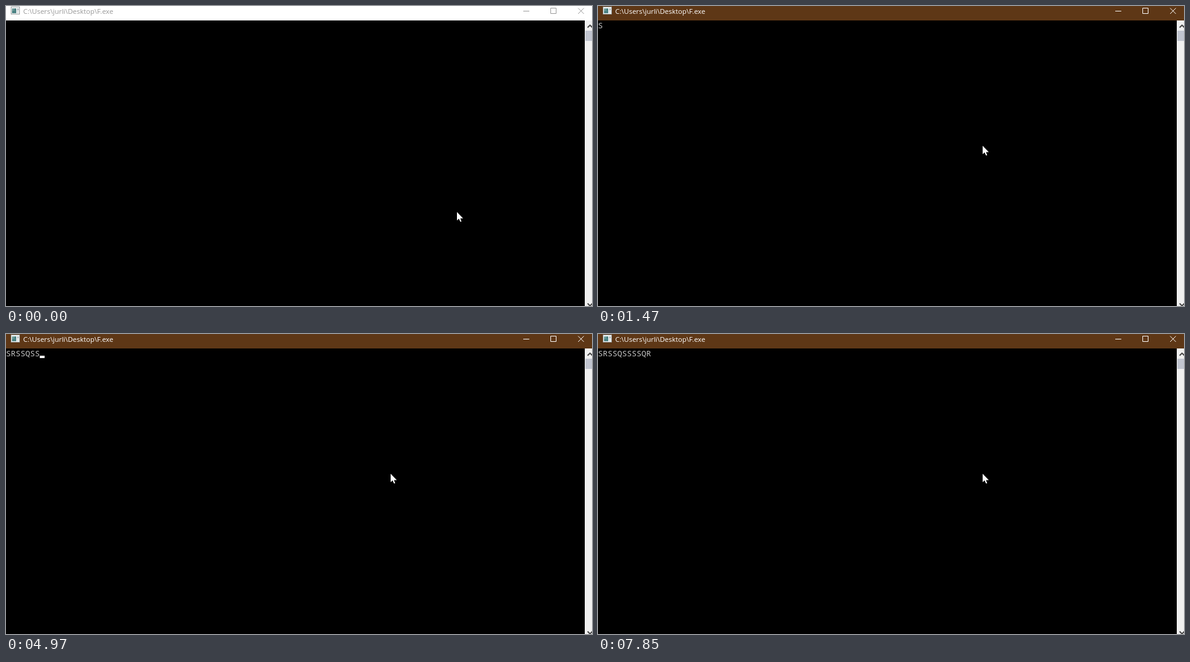
These frames come from a looping animation (972 by 498 pixels, 8 s). An HTML page:

```html
<!DOCTYPE html>
<html lang="en">
<head>
<meta charset="utf-8">
<title>Console</title>
<style>
  html, body { margin: 0; width: 100%; height: 100%; overflow: hidden; background: #000; }
  svg { display: block; width: 972px; height: 498px; }

  .bar, .ink, .pointer, .click, .cover, .caret {
    animation: 8000ms step-end -1ms infinite;
  }
  .bar { animation-name: bar; }
  .ink { animation-name: ink; }
  .pointer { animation-name: move; }
  .click { animation-name: click; }
  .cover { animation-name: type; }
  .caret { animation-name: blink; }

  .title { font: 11.5px "Open Sans", "Noto Sans", sans-serif; fill: currentColor; }
  .typed { font: 13.333px "Noto Sans Mono", "DejaVu Sans Mono", monospace; fill: #c4c4c4; white-space: pre; }
  .line { fill: none; stroke: currentColor; }

  /* the window gains focus on the click */
  @keyframes bar { 0% { fill: #fff; } 5.625%, 100% { fill: #5e3716; } }
  @keyframes ink { 0% { color: #999; } 5.625%, 100% { color: #fff; } }
  @keyframes click { 0%, 6.75%, 100% { opacity: 0; } 5.625% { opacity: 1; } }

  @keyframes move {
    0% { transform: translate(748px, 342px); }
    .875% { transform: translate(693px, 287px); }
    1.875%, 100% { transform: translate(638px, 232px); }
  }

  /* one 8px cell is uncovered per key press */
  @keyframes type {
    0% { transform: translateX(0); }
    18.375% { transform: translateX(8px); }
    25.25% { transform: translateX(16px); }
    32.125% { transform: translateX(24px); }
    37.875% { transform: translateX(32px); }
    46.625% { transform: translateX(40px); }
    55.25% { transform: translateX(48px); }
    62.125% { transform: translateX(56px); }
    68% { transform: translateX(64px); }
    74.875% { transform: translateX(72px); }
    82.5% { transform: translateX(80px); }
    93.375%, 100% { transform: translateX(88px); }
  }

  @keyframes blink {
    0%, 38.875%, 52.375%, 58.125%, 65.25%, 72%, 78.75%, 84.625%, 98.125%, 100% { opacity: 0; }
    37.875%, 45.75%, 55.25%, 62.125%, 68%, 74.875%, 82.5%, 91.5% { opacity: 1; }
  }
</style>
</head>
<body>
<svg viewBox="0 0 972 498">
  <rect width="972" height="498"/>

  <text class="typed" x="0" y="37">SRSSQSSSSQR</text>
  <g class="cover">
    <rect y="25" width="100" height="18"/>
    <rect class="caret" y="36" width="8" height="4" fill="#fff"/>
  </g>

  <rect class="bar" width="972" height="24" fill="#fff"/>
  <g class="icon">
    <rect x="8.5" y="1.5" width="14" height="12" fill="#f4f6f6" stroke="#9a9f9f"/>
    <rect x="10" y="4" width="7" height="8" fill="#4b8283"/>
    <rect x="10" y="4" width="4" height="4" fill="#6a9a98"/>
    <rect x="18" y="4" width="3" height="8" fill="#dfe4e5"/>
    <rect x="19" y="4" width="2" height="3" fill="#a9b3b8"/>
  </g>
  <g class="ink">
    <text class="title" x="28.5" y="13">C:\Users\jurli\Desktop\F.exe</text>
    <path class="line" d="M858 8.5h10M903.5 3.5h9v9h-9zM949 3.5l9.5 9.5M958.5 3.5l-9.5 9.5"/>
  </g>

  <g class="scrollbar">
    <rect x="960" y="24" width="12" height="474" fill="#f0f0f0"/>
    <rect x="961" y="41" width="11" height="17" fill="#c1c5d0"/>
    <path d="M964.7 35.8l4-4 4 4M964.7 493.7l4 4 4-4" fill="none" stroke="#454545" stroke-width="2"/>
  </g>

  <path class="pointer" d="M0 0V14L3.2 11L5.5 16H7.5L5.6 10.5H10.2Z" fill="#fff"/>
  <circle class="click" cx="637" cy="230" r="12" fill="#fff00a" fill-opacity=".5"/>
</svg>
</body>
</html>
```
